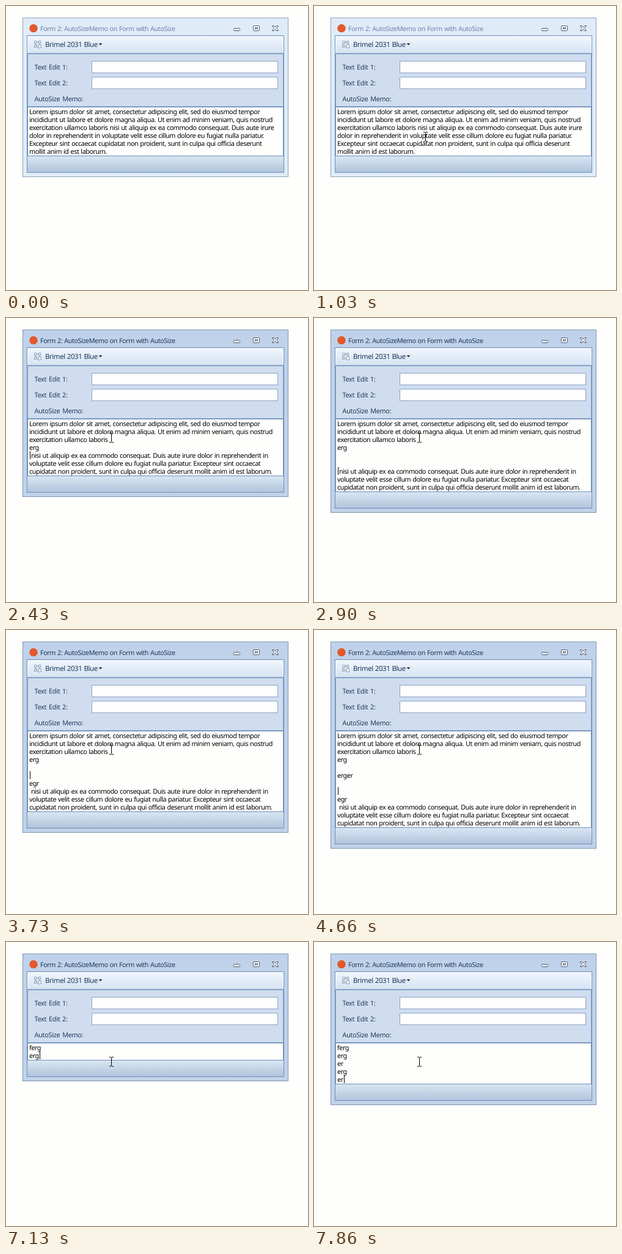
Recreate the animation shown at these times as an HTML page. Size 494x465 px, loop 8 s.

```html
<!DOCTYPE html>
<html lang="en">
<head>
<meta charset="utf-8">
<title>AutoSize memo</title>
<style>
  html, body { margin: 0; width: 100%; height: 100%; overflow: hidden; background: #fefefc; }
  svg { display: block; }
  text {
    font: 10.8px "Noto Sans", sans-serif;
    letter-spacing: -.25px;
    word-spacing: 1.2px;
    white-space: pre;
    text-rendering: geometricPrecision;
    fill: #1e395b;
  }
  #menu { font-size: 11.5px; letter-spacing: -.45px; word-spacing: .6px; }
  #frame { fill: #dfecf7; stroke: #8da3bd; }
  #title { fill: #7080b0; letter-spacing: -.42px; word-spacing: .6px; }
  .active #frame { fill: #bfd2e9; stroke: #8096b5; }
  .active #title { fill: #1e395b; }
  #rows text { fill: #000; letter-spacing: -.44px; word-spacing: .6px; }
  #rows rect { fill: none; }
  .selected #rows rect { fill: #3399ff; }
  .selected #rows text { fill: #fff; }
  .field { fill: #fefefc; stroke: #8ba3c7; }
  .glyph { fill: #fff; stroke: #4a5568; }
  .crisp { shape-rendering: crispEdges; }
</style>
</head>
<body>
<svg id="stage" width="494" height="465" viewBox="0 0 494 465">
  <defs>
    <linearGradient id="barFill" x2="0" y2="1">
      <stop stop-color="#f1f6fc"/><stop offset="1" stop-color="#d5e3f3"/>
    </linearGradient>
    <linearGradient id="footFill" x2="0" y2="1">
      <stop stop-color="#d8e5f3"/><stop offset=".45" stop-color="#c7d7e9"/><stop offset="1" stop-color="#b0c4dc"/>
    </linearGradient>
  </defs>

  <rect id="frame" x="27.5" y="19.5" width="434"/>
  <circle cx="45" cy="36.5" r="6.8" fill="#e2592c"/>
  <text id="title" x="56" y="41">Form 2: AutoSizeMemo on Form with AutoSize</text>
  <rect class="glyph" x="372.5" y="36.5" width="10" height="4" rx="1"/>
  <rect class="glyph" x="404.5" y="32.5" width="10" height="8" rx="1"/>
  <rect class="glyph" x="407.5" y="35.5" width="4" height="2"/>
  <path class="glyph" d="M435.5 32.5h3l2 2.5 2-2.5h3l-3 4 3 4h-3l-2-2.5-2 2.5h-3l3-4z"/>

  <g class="crisp">
    <rect id="inner" x="34.5" y="48.5" width="420" fill="#cfddee" stroke="#718fb8"/>
    <rect x="35" y="49" width="419" height="28" fill="url(#barFill)"/>
    <path d="M35.5 49V77M453.5 49V77" stroke="#fff"/>
    <rect x="35" y="77" width="419" height="2" fill="#86a1c9"/>
    <path d="M35.5 79V165M453.5 79V165" stroke="#86a1c9"/>
    <g fill="#f4f8fc" stroke="#8c9fba">
      <path d="M46.5 57.5h4v4h-4zM46.5 64.5h3v3h-3zM53.5 57.5h3v3h-3zM52.5 63.5h5v5h-5z"/>
      <path d="M51 59.5h2M48.5 62v2M55.5 61v2M50 66.5h2"/>
    </g>
    <rect class="field" x="140.5" y="90.5" width="304" height="19"/>
    <rect class="field" x="140.5" y="116.5" width="304" height="19"/>
    <rect x="35" y="164" width="419" height="2" fill="#86a1c9"/>
    <rect id="memo" x="35.5" y="165.5" width="418" fill="#fefefc" stroke="#718fb8"/>
    <rect id="foot" x="35" width="419" height="26" fill="url(#footFill)"/>
  </g>
  <text id="menu" x="64" y="67">Brimel 2031 Blue</text>
  <path d="M151.5 61h6l-3 3.5z" fill="#1e395b"/>
  <text x="46.5" y="104">Text Edit 1:</text>
  <text x="46.5" y="130">Text Edit 2:</text>
  <text x="46.5" y="156">AutoSize Memo:</text>

  <g id="rows"></g>
  <rect id="caret" class="crisp" width="1" height="13"/>
  <g id="pointer">
    <path id="arrow" d="M.5 .5v16l3.7-3.6 2.5 5.8 2.2-1-2.4-5.6h5.2z" fill="#fff" stroke="#000"/>
    <path id="beam" class="crisp" d="M-3 -7.5h3M1 -7.5h3M.5 -7v14M-3 7.5h3M1 7.5h3" fill="none" stroke="#000"/>
  </g>
</svg>
<script>
const LOOP = 8000, LINE = 13, TOP = 166, LEFT = 38;
const $ = id => document.getElementById(id);
const set = (el, attrs) => { for (const k in attrs) el.setAttribute(k, attrs[k]); };

const opening = `Lorem ipsum dolor sit amet, consectetur adipiscing elit, sed do eiusmod tempor
incididunt ut labore et dolore magna aliqua. Ut enim ad minim veniam, quis nostrud
exercitation ullamco laboris`;
const full = mark => `${opening}${mark} nisi ut aliquip ex ea commodo consequat. Duis aute irure
dolor in reprehenderit in voluptate velit esse cillum dolore eu fugiat nulla pariatur.
Excepteur sint occaecat cupidatat non proident, sunt in culpa qui officia deserunt
mollit anim id est laborum.`;
const split = typed => `${opening}
${typed} nisi ut aliquip ex ea commodo consequat. Duis aute irure dolor in reprehenderit in
voluptate velit esse cillum dolore eu fugiat nulla pariatur. Excepteur sint occaecat
cupidatat non proident, sunt in culpa qui officia deserunt mollit anim id est laborum.`;

// [time, memo text]; "|" marks the caret
const inserts = [
  [1800, ''], [1930, '|'],
  [2160, 'e|'], [2260, 'er|'], [2330, 'erg|'], [2430, 'erg\n|'],
  [2730, 'erg\n\n|'], [2830, 'erg\n\n\n|'], [2960, 'erg\n\n\ne|'], [3030, 'erg\n\n\neg|'],
  [3100, 'erg\n\n\negr|'], [3230, 'erg\n\n\negr\n|'],
  [3560, 'erg\n\n\n|egr\n'], [3730, 'erg\n\n|\negr\n'],
  [4100, 'erg\n\ne|\negr\n'], [4130, 'erg\n\ner|\negr\n'], [4160, 'erg\n\nerg|\negr\n'],
  [4300, 'erg\n\nerger|\negr\n'], [4430, 'erg\n\nerger\n|\negr\n'],
  [4600, 'erg\n\nerger\n\n|\negr\n'], [4800, 'erg\n\nerger\n\n\n|\negr\n'],
  [5160, 'erg\n\nerger\n\n\n\negr\n']
].map(([time, typed]) => [time, split(typed)]);
const steps = [
  [0, full('')], [1130, full('|')], ...inserts,
  [5700, '|'], [5800, ''],
  [6330, 'f|'], [6400, 'fer|'], [6460, 'ferg|'], [6560, 'ferg\n|'],
  [7000, 'ferg\ne|'], [7060, 'ferg\ner|'], [7130, 'ferg\nerg|'], [7200, 'ferg\nerg\n|'],
  [7360, 'ferg\nerg\ne|'], [7460, 'ferg\nerg\ner|'], [7530, 'ferg\nerg\ner\n|'],
  [7600, 'ferg\nerg\ner\ne|'], [7660, 'ferg\nerg\ner\ner|'],
  [7800, 'ferg\nerg\ner\nerg|'], [7830, 'ferg\nerg\ner\nerg\n|'], [7860, 'ferg\nerg\ner\nerg\ner|']
];

const make = (name, attrs) => {
  const el = document.createElementNS('http://www.w3.org/2000/svg', name);
  set(el, attrs);
  return $('rows').appendChild(el);
};
const rows = Array.from({ length: 13 }, (_, i) => ({
  back: make('rect', { x: LEFT + 1, y: TOP + i * LINE, height: LINE }),
  text: make('text', { x: LEFT, y: TOP + 11 + i * LINE })
}));

function showMemo(content) {
  const lines = content.split('\n');
  const grow = (lines.length - 1) * LINE;
  $('caret').setAttribute('visibility', 'hidden');
  rows.forEach(({ back, text }, i) => {
    const line = lines[i] || '', col = line.indexOf('|');
    text.textContent = line.replace('|', '');
    back.setAttribute('width', line ? text.getComputedTextLength() : 0);
    if (col >= 0) {
      const offset = col ? text.getSubStringLength(0, col) : 0;
      set($('caret'), { x: Math.round(LEFT + 1 + offset), y: TOP + i * LINE, visibility: 'visible' });
    }
  });
  $('frame').setAttribute('height', 195 + grow);
  $('inner').setAttribute('height', 159 + grow);
  $('memo').setAttribute('height', 15 + grow);
  $('foot').setAttribute('y', 181 + grow);
}

function showPointer(t) {
  const p = Math.min(1, Math.max(0, (t - 400) / 760));
  const ease = p * p * (3 - 2 * p);
  const nudge = Math.min(1, Math.max(0, (t - 1200) / 60));
  const x = Math.round(300 - 128 * ease);
  const y = Math.round(372 - 171 * ease - 5 * nudge);
  const overMemo = y < 245;
  set($('pointer'), { transform: `translate(${x} ${y})`, visibility: t < 400 ? 'hidden' : 'visible' });
  $('arrow').style.display = overMemo ? 'none' : '';
  $('beam').style.display = overMemo ? '' : 'none';
}

let start, shown;
function draw(now) {
  start ??= now;
  const t = (now - start) % LOOP;
  const step = steps.findLast(([time]) => time <= t);
  if (step !== shown) showMemo((shown = step)[1]);
  $('stage').classList.toggle('active', t >= 1130);
  $('stage').classList.toggle('selected', t >= 5160 && t < 5700);
  showPointer(t);
  requestAnimationFrame(draw);
}
requestAnimationFrame(draw);
</script>
</body>
</html>
```
